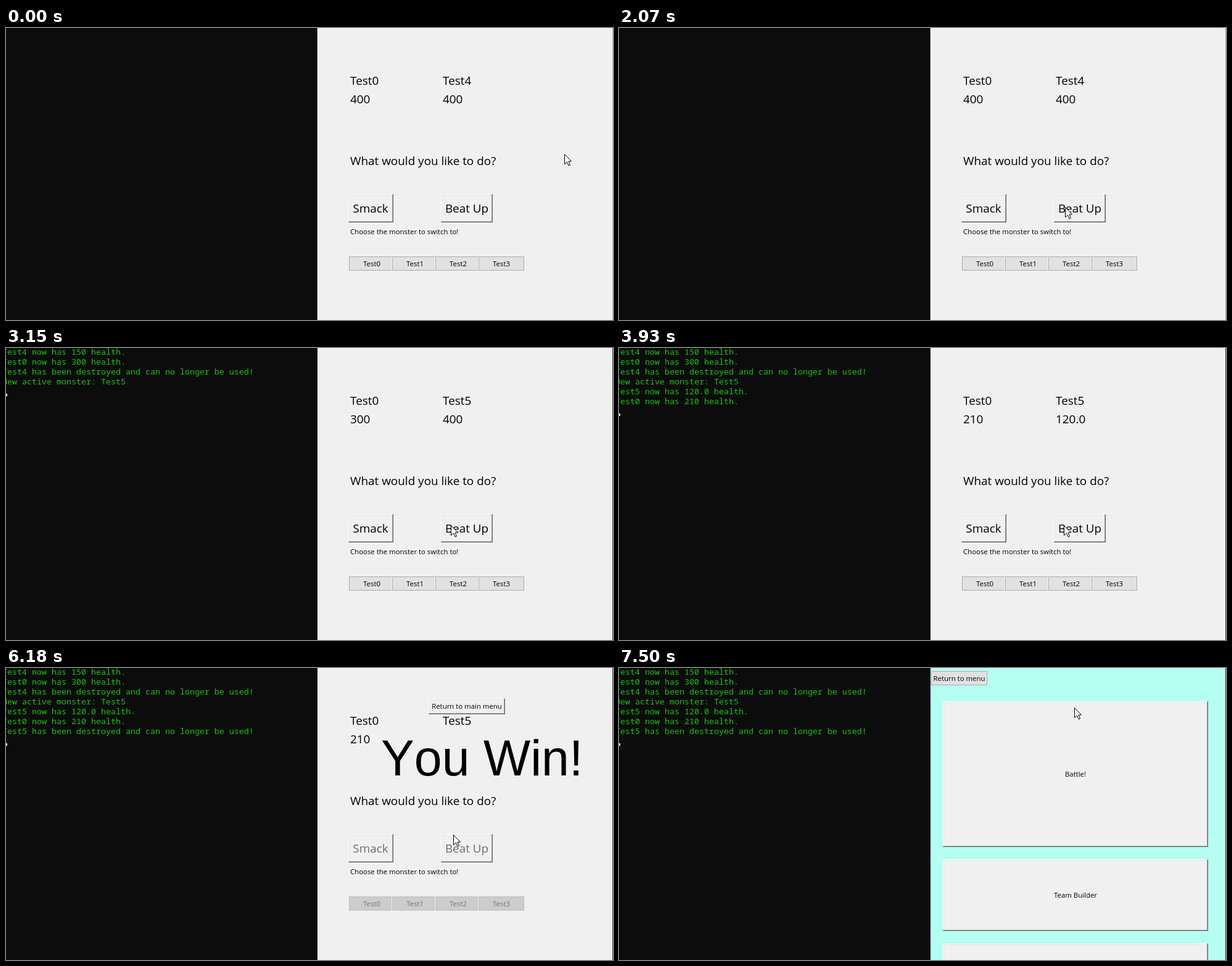
Recreate the animation shown at these times as an HTML page with a canvas. Size 984 px wide and 473 px high, loop 7650 ms.

```html
<!DOCTYPE html>
<html lang="en">
<head>
<meta charset="utf-8">
<title>Monster battle</title>
<style>
html, body { margin: 0; width: 100%; height: 100%; overflow: hidden; background: #0c0c0c; }
canvas { display: block; }
</style>
</head>
<body>
<canvas id="stage" width="984" height="473"></canvas>
<script>
const g = document.getElementById('stage').getContext('2d');
const LOOP = 7650, STEP = 76.6, HOLD = 70;
const SMALL = '11.4px "Open Sans", "Noto Sans", sans-serif';
const LARGE = '18.9px "Open Sans", "Noto Sans", sans-serif';
const MONO = '13.33px "Noto Sans Mono", "DejaVu Sans Mono", monospace';
const HUGE = '80.7px "Liberation Sans", Arial, sans-serif';
const PANEL = '#f0f0f0';

// Each click: when the button goes down, and what its release prints
const CLICKS = [
  { at: 2310, prints: ['Test4 now has 150 health.', 'Test0 now has 300 health.'] },
  { at: 2920, prints: ['Test4 has been destroyed and can no longer be used!', 'New active monster: Test5'] },
  { at: 3780, prints: ['Test5 now has 120.0 health.', 'Test0 now has 210 health.'] },
  { at: 4790, prints: ['Test5 has been destroyed and can no longer be used!'] },
  { at: 7100, prints: [] }
];

// Pointer strokes, eased from the previous end point, optionally bent via a control point
const STROKES = [
  { from: 533, to: 610, end: [897, 204] },
  { from: 683, to: 1220, end: [673, 392], via: [800, 88] },
  { from: 1220, to: 2140, end: [724, 288] },
  { from: 3000, to: 3150, end: [721, 287] },
  { from: 6020, to: 6570, end: [737, 64], via: [748, 170] },
  { from: 7420, to: 7500, end: [738, 64] }
];

function pointer(t) {
  let pos = [905, 204];
  for (const { from, to, end, via } of STROKES) {
    if (t < from) break;
    // the picture refreshes in steps that land on the stroke's end
    const left = Math.max(0, Math.ceil((to - t) / STEP) * STEP);
    const u = Math.max(0, 1 - left / (to - from)), s = u * u * (3 - 2 * u);
    const start = pos;
    pos = end.map((e, i) => {
      const c = via ? via[i] : (start[i] + e) / 2;
      return Math.round((1 - s) ** 2 * start[i] + 2 * s * (1 - s) * c + s * s * e);
    });
  }
  return pos;
}

function health(name, log) {
  const last = log.filter(s => s.startsWith(name + ' now')).pop();
  return last ? last.split(' ')[3] : '400';
}

function rect(x, y, w, h, color) {
  g.fillStyle = color;
  g.fillRect(x, y, w, h);
}

function text(s, x, y, font = SMALL, color = '#000', align = 'left') {
  g.font = font;
  g.fontKerning = font === HUGE ? 'none' : 'normal';
  g.fillStyle = color;
  g.textAlign = align;
  g.fillText(s, x, y);
}

// Classic 3D button; bevel colours run from the outside in
function button(label, x, y, w, h, font, down = false, color = '#000') {
  const bevel = down
    ? [['#a0a0a0', '#fff'], ['#696969', '#e3e3e3']]
    : [['#fff', '#696969'], ['#e3e3e3', '#a0a0a0']];
  bevel.forEach(([light, dark], i) => {
    rect(x + i, y + i, w - 2 * i, h - 2 * i, dark);
    rect(x + i, y + i, w - 2 * i - 1, h - 2 * i - 1, light);
  });
  rect(x + 2, y + 2, w - 4, h - 4, PANEL);
  const shift = +down, drop = font === LARGE ? 7 : 4;
  text(label, x + Math.floor(w / 2) + shift, y + Math.floor(h / 2) + drop + shift, font, color, 'center');
}

function flatButton(x, y, w, h, fill, border) {
  rect(x, y, w, h, border);
  rect(x + 1, y + 1, w - 2, h - 2, fill);
}

function monsterButtons(won, [px, py]) {
  for (let i = 0; i < 4; i++) {
    const x = 556 + 70 * i;
    const hover = px >= x && px < x + 70 && py >= 370 && py < 393;
    const [fill, border] = won ? ['#cccccc', '#bfbfbf']
      : hover ? ['#e5f1fb', '#0078d7'] : ['#e1e1e1', '#adadad'];
    flatButton(x, 370, 74, 23, fill, border);
    if (i) rect(x - 1, 370, 1, 23, PANEL);
    text('Test' + i, x + 37, 386, SMALL, won ? '#6d737b' : '#000', 'center');
  }
}

function consolePane(log) {
  log.forEach((s, i) => text(s, -6, 11 + 16 * i, MONO, '#16c60c'));
  if (log.length) rect(0, 16 * log.length + 10, 2, 4, '#fff');
}

function battle(log, won, down, at) {
  const foe = log.some(s => s.startsWith('New')) ? 'Test5' : 'Test4';
  const ink = won ? '#6d6d6d' : '#000';
  rect(505, 0, 478, 473, PANEL);
  text('Test0', 558, 92, LARGE);
  text(health('Test0', log), 558, 122, LARGE);
  text(foe, 708, 92, LARGE);
  if (!won) text(health(foe, log), 708, 122, LARGE);
  text('What would you like to do?', 558, 222, LARGE);
  button('Smack', 555, 269, 73, 46, LARGE, false, ink);
  button('Beat Up', 705, 269, 84, 46, LARGE, down && !won, ink);
  text('Choose the monster to switch to!', 558, 334);
  monsterButtons(won, at);
  if (won) {
    button('Return to main menu', 685, 49, 124, 26, SMALL, down);
    text('You Win!', 608, 174, HUGE);
  }
}

function menu() {
  rect(505, 0, 478, 473, '#b4fff1');
  flatButton(506, 5, 91, 23, '#e1e1e1', '#b9a3a6');
  text('Return to menu', 551.5, 21, SMALL, '#000', 'center');
  button('Battle!', 525, 54, 430, 236, SMALL);
  button('Team Builder', 525, 310, 430, 116, SMALL);
  button('', 525, 446, 430, 116, SMALL);
}

const ARROW = new Path2D('M.5 .5V16.5L4.5 13L7.2 19L9.5 18L7 12H11.5Z');

function drawPointer([x, y], down) {
  if (down) {
    g.fillStyle = 'rgba(255, 245, 0, .58)';
    g.beginPath();
    g.arc(x, y + .5, 12, 0, 7);
    g.fill();
  }
  g.save();
  g.translate(x, y);
  g.fillStyle = '#fff';
  g.strokeStyle = '#000';
  g.fill(ARROW);
  g.stroke(ARROW);
  g.restore();
}

function draw(t) {
  const done = CLICKS.filter(c => t >= c.at + HOLD);
  const log = done.flatMap(c => c.prints);
  const down = CLICKS.filter(c => t >= c.at).length > done.length;
  const at = pointer(t), active = t >= 2140;
  rect(0, 0, 984, 473, '#0c0c0c');
  consolePane(log);
  if (done.length < CLICKS.length) battle(log, done.length === 4, down, at);
  else menu();
  rect(504, 0, 1, 473, active ? '#1a1a1a' : '#555');
  rect(983, 0, 1, 473, active ? '#333' : '#aaa');
  drawPointer(at, down);
}

const begin = performance.now();
function tick() {
  draw((performance.now() - begin) % LOOP);
  requestAnimationFrame(tick);
}
tick();
</script>
</body>
</html>
```
